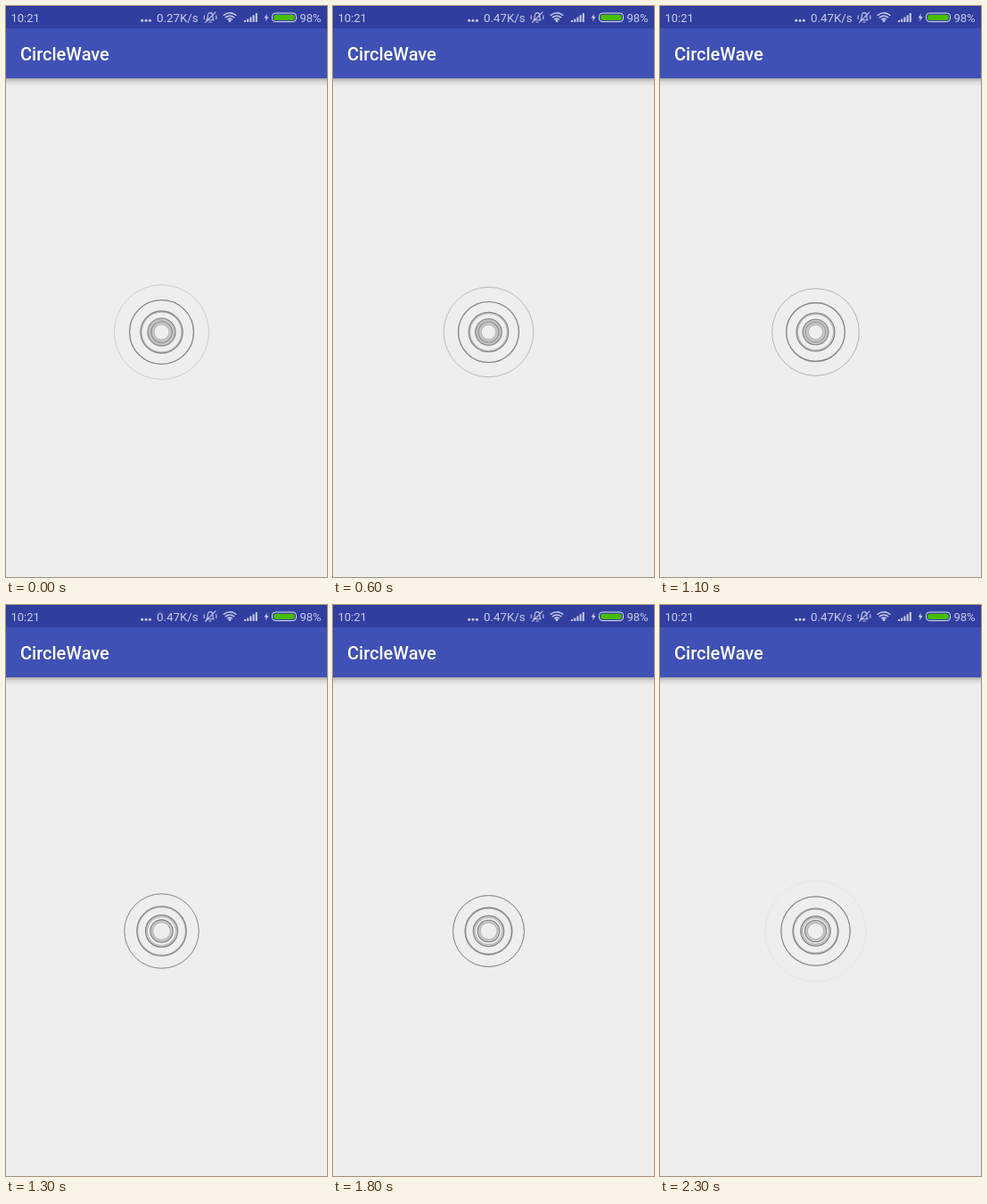
Animation, 360 px wide and 640 px high, one loop 2.4 s. Source, as an HTML page:

```html
<!DOCTYPE html>
<html lang="en">
<head>
<meta charset="utf-8">
<title>CircleWave</title>
<style>
html, body { margin: 0; width: 100%; height: 100%; overflow: hidden; background: #eee; }
svg { display: block; width: 360px; height: 640px; }
text { font-family: Roboto, sans-serif; }
.status { font-size: 13px; fill: #c8ccea; }
.line { fill: none; stroke: #c8ccea; stroke-width: 1.1; stroke-linecap: round; stroke-linejoin: round; }
.solid { fill: #c8ccea; }
</style>
</head>
<body>
<svg viewBox="0 0 360 640">
  <defs>
    <linearGradient id="shade" x2="0" y2="1">
      <stop offset="0" stop-color="#000" stop-opacity=".3"/>
      <stop offset=".4" stop-color="#000" stop-opacity=".1"/>
      <stop offset="1" stop-color="#000" stop-opacity="0"/>
    </linearGradient>
  </defs>
  <rect width="360" height="640" fill="#eee"/>
  <rect y="81" width="360" height="9" fill="url(#shade)"/>
  <rect width="360" height="81" fill="#3f51b5"/>
  <rect width="360" height="25" fill="#303f9f"/>
  <text x="16" y="61" font-size="20" font-weight="500" fill="#fff">CircleWave</text>

  <g class="status">
    <text x="5.5" y="17.5">10:21</text>
    <text id="speed" x="169" y="17.5" font-size="13.3"></text>
    <text x="329.5" y="17.5">98%</text>
  </g>
  <g class="solid">
    <circle cx="152.6" cy="16.2" r="1.5"/>
    <circle cx="157" cy="16.2" r="1.5"/>
    <circle cx="161.4" cy="16.2" r="1.5"/>
    <circle cx="251" cy="16.6" r="1.5"/>
    <path d="M267 16h2v2h-2zM270.2 14.5h2V18h-2zM273.4 12.5h2V18h-2zM276.6 10.3h2V18h-2zM279.8 8h2v10h-2z"/>
    <path d="M292.8 8.5l-3.2 5h2.2l-.8 4 3.6-5.4h-2.3z"/>
  </g>
  <!-- muted bell and wifi -->
  <path class="line" d="M225 15.8c1.3-1 1.2-2.5 1.2-4.4 0-5 5.6-5 5.6 0 0 1.9 0 3.4 1.2 4.4zM228 18h2.2M235 6.8L223.6 18.4M222.2 10.8v3.6M235.8 10.8v3.6"/>
  <path class="line" style="stroke-width:1.5" d="M244.2 10.3q6.8-5.2 13.6 0M246.4 12.7q4.6-3.4 9.2 0M248.6 14.8q2.4-1.6 4.8 0"/>
  <rect x="298.5" y="8" width="27" height="9.6" rx="3.6" fill="none" stroke="#dfe2f4"/>
  <rect x="300.2" y="9.7" width="23.6" height="6.2" rx="2.2" fill="#48bd00"/>

  <g id="rings" fill="none" transform="translate(174.5 365.5)"></g>
</svg>
<script>
const LOOP = 2400, STEP = 100, RINGS = 5;
const rings = document.getElementById('rings');
const speed = document.getElementById('speed');

// [time, wave phase]; the rings drift inwards at a slightly uneven rate
const drift = [[0, .4], [200, .06], [600, -.74], [800, -1.21],
               [1300, -2.23], [1800, -3.34], [2300, -4.42]];

function phaseAt(t) {
  const i = drift.findIndex(([end], n) => n && t <= end);
  const [t0, p0] = drift[i - 1], [t1, p1] = drift[i];
  const p = p0 + (p1 - p0) * (t - t0) / (t1 - t0);
  return p - Math.floor(p);
}

// A stroke whose outer rim lies at the given radius
const band = (rim, width, color) =>
  `<circle r="${rim - width / 2}" stroke="${color}" stroke-width="${width}"/>`;

function ring(q) {
  const r = 11.9 + 2.13 * q * q;
  const w = .95 * (4.65 - q);
  if (w <= 0) return '';
  let out = band(r, w, '#c6c6c6');
  if (w > 1.6) out += band(r - w + .8, .8, '#b0b0b0');
  return out + band(r, Math.min(w, 1.1), '#828282');
}

function draw(now) {
  const t = Math.floor(now % LOOP / STEP) * STEP;
  const phase = phaseAt(t);
  rings.innerHTML = Array.from({ length: RINGS }, (_, k) => ring(phase + k)).join('');
  speed.textContent = t < 400 ? '0.27K/s' : '0.47K/s';
}

const start = performance.now();
function tick() {
  draw(performance.now() - start);
  requestAnimationFrame(tick);
}
tick();
</script>
</body>
</html>
```
